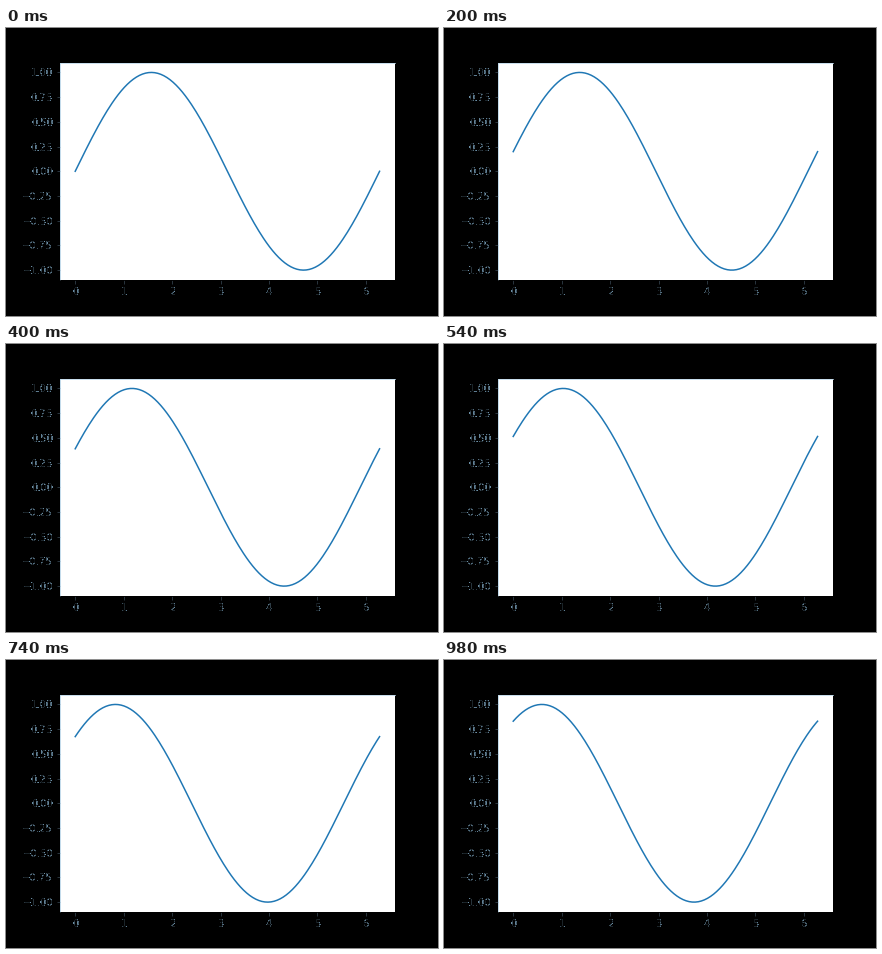
A matplotlib script for the animation above (1000 ms loop, 432x288 px).

```python
import numpy as np
import matplotlib.pyplot as plt
from matplotlib.animation import FuncAnimation

FRAMES = 50
PHASE_STEP = 0.02
EDGE_TINT = np.array([0.62, 0.82, 0.95])
PALE_BLUE = "#b4d2e6"

plt.rcParams.update({
    "font.family": "DejaVu Sans",
    "font.size": 10,
    "figure.subplot.bottom": 0.125,
})


def glowing_edges(image, dpi):
    """Keep solid ink black and let only its soft antialiased rim show."""
    alpha = image[..., 3:4]
    rim = np.where(alpha > 0.3, 1 - alpha, 0)
    color = rim * EDGE_TINT
    return np.concatenate([color, (alpha > 0).astype(float)], axis=2), 0, 0


fig, ax = plt.subplots(figsize=(6, 4), dpi=72, facecolor="black")
x = np.linspace(0, 2 * np.pi, 200)
line, = ax.plot(x, np.sin(x), color="#1f77b4", lw=1.5)

for axis in (ax.xaxis, ax.yaxis):
    for tick in axis.get_major_ticks():
        tick.label1.set_agg_filter(glowing_edges)
ax.tick_params(color="#33414c")

ax.spines["left"].set_color(PALE_BLUE)
ax.spines["top"].set(color=PALE_BLUE, linestyle=(0, (1.25, 1.25)))
ax.spines[["right", "bottom"]].set_color("black")


def update(frame):
    line.set_ydata(np.sin(x + frame * PHASE_STEP))
    return line,


anim = FuncAnimation(fig, update, frames=FRAMES, interval=20, repeat=True)
plt.show()
```
